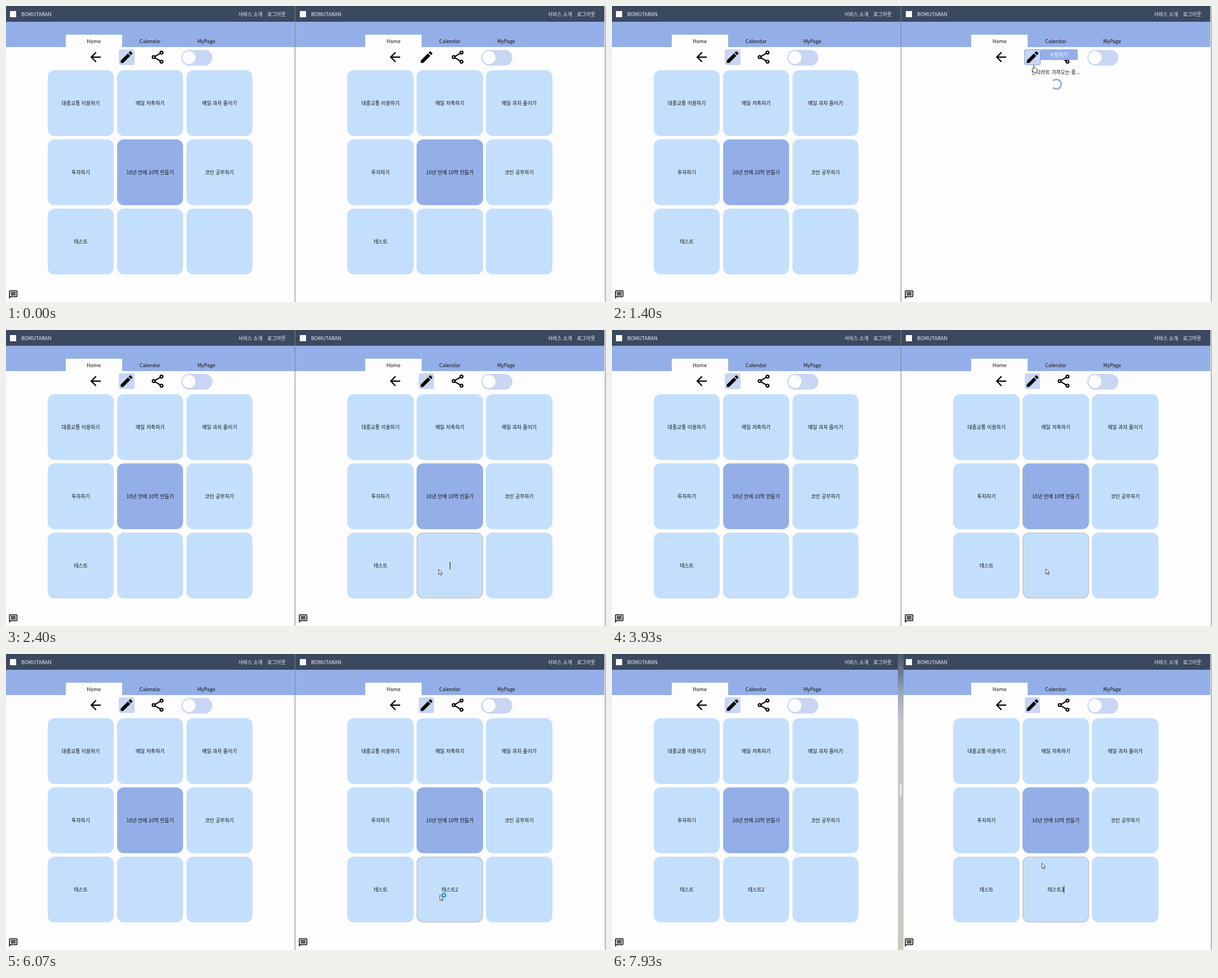
An HTML page that plays this animation: 1064 by 526 pixels, repeating every 8000 ms.

```html
<!DOCTYPE html>
<html lang="ko">
<head>
<meta charset="utf-8">
<title>Goal board</title>
<style>
html, body { margin: 0; width: 100%; height: 100%; overflow: hidden; }
body {
  position: relative; background: #fdfdfd; color: #111;
  font: 8.86px/14px "Noto Sans CJK KR", "Noto Sans CJK", "Noto Sans", sans-serif;
  --band: #94afe7; --pale: #c8d6f3; --cell: #c4dffc;
}
body *, body *::before { box-sizing: border-box; }
.pane, .main, .main *, header, header *, .split, .edge, .chat, #cursor { position: absolute; }
.pane { top: 0; height: 526px; overflow: hidden; }
.left { left: -1px; width: 513px; }
.right { left: 513px; width: 548px; }
svg { overflow: visible; display: block; }

header { inset: 0 0 auto; height: 28px; background: #3b495f; color: #f2f4f7; white-space: nowrap; }
header * { top: 8px; }
.logo { left: 8px; top: 9px; width: 11px; height: 11px; background: #fff; }
.brand { left: 28px; }
.about { right: 57px; }
.logout { right: 16px; }
.nav { position: absolute; inset: 28px 0 auto; height: 44.5px; background: var(--band); }

.main { left: 50%; top: 0; }
.tab { top: 50.5px; width: 99.6px; height: 22px; text-align: center; line-height: 23px; }
.tab.on { background: #fdfdfd; }
.icon { top: 77px; width: 27.7px; height: 27.7px; }
.icon svg { width: 100%; height: 100%; }
.fill { inset: 0; border-radius: 3px; background: var(--pale); }
.pencil.hover::before {
  content: ""; position: absolute; inset: -.3px; z-index: 1;
  border: 1.4px solid #7d9edb; border-radius: 3px;
}
.tip {
  left: -28.3px; top: 77px; width: 67px; height: 18.6px; border-radius: 3px;
  background: var(--band); color: #fff; text-align: center; line-height: 19px; visibility: hidden;
}
.pencil.hover ~ .tip { visibility: visible; }
.toggle { left: 55.5px; top: 78px; width: 55px; height: 27.5px; border-radius: 14px; background: var(--pale); }
.toggle i { left: 2.2px; top: 2.2px; width: 23px; height: 23px; border-radius: 50%; background: #fdfdfd; }
.cell {
  display: flex; align-items: center; justify-content: center;
  width: 117.4px; height: 117.4px; border-radius: 12px; background: var(--cell); white-space: nowrap;
}
.cell.core { background: var(--band); }
.cell.hover { box-shadow: inset 0 0 0 1.6px #c3c5ca; }
.cell span { position: relative; min-height: 14px; }
.cell .caret { position: absolute; left: 100%; top: 0; width: 1px; height: 13px; margin-left: -.5px; background: #111; }
.chat { left: 5px; top: 504.4px; width: 17.7px; height: 17.7px; }

.loading { left: -70px; top: 111px; width: 140px; text-align: center; }
.spinner {
  left: 61px; top: 18px; width: 19.5px; height: 19.5px; border-radius: 50%;
  border: 3.2px solid var(--band); border-left-color: transparent;
  animation: spin 1s linear infinite;
}
.split { left: 512px; top: 0; width: 1px; height: 526px; background: #7c7f83; }
.split.wide {
  left: 507px; width: 10px;
  background: linear-gradient(#4c5668, #7e8aa2 9%, #a4adc0 14%, #c3c6cb 24%, #c6c9c8 70%, #c4ccbb);
}
.wide i { position: absolute; left: 4px; top: 232px; width: 2px; height: 19px; border-radius: 1px; background: #fff; }
.edge { left: 1061px; top: 0; width: 3px; height: 526px; background: linear-gradient(90deg, #fdfdfd 33%, #8d958f 33% 67%, #d9e0d8 67%); }
#cursor { left: 0; top: 0; width: 1px; height: 1px; }
#cursor > * { position: absolute; }
#cursor .hand, #cursor.point .arrow { visibility: hidden; }
#cursor.point .hand { visibility: visible; }

/* 8 s cycle, hard switches */
.right .fill, .right .chat, .right .grid, .loading, .caret, .synced, .wide, .ring {
  animation: 8s step-end infinite;
}
.right .fill, .right .chat { animation-name: clicked; }
.right .grid { animation-name: reload; }
.loading { animation-name: load; }
.caret { animation-name: blink; }
.synced { animation-name: sync; }
.wide { animation-name: widen; }
.ring { animation-name: busy; }
@keyframes clicked { 0% { opacity: 0 } 15% { opacity: 1 } }
@keyframes reload { 0% { opacity: 1 } 15% { opacity: 0 } 19.5% { opacity: 1 } }
@keyframes load { 0% { opacity: 0 } 15% { opacity: 1 } 19.5% { opacity: 0 } }
@keyframes sync { 0% { opacity: 0 } 79.1% { opacity: 1 } }
@keyframes widen { 0% { opacity: 0 } 94.1% { opacity: 1 } }
@keyframes busy { 0% { opacity: 0 } 52.5% { opacity: 1 } 92.4% { opacity: 0 } }
@keyframes blink {
  0%, 35.87%, 49%, 75.75%, 89.12% { opacity: 0 }
  29.19%, 42.44%, 50.87%, 82.5%, 95.75% { opacity: 1 }
}
@keyframes spin { from { transform: rotate(-144deg) } to { transform: rotate(216deg) } }
</style>
</head>
<body>
<script>
const icons = {
  back: '<path d="M20 11H7.83l5.59-5.59L12 4l-8 8 8 8 1.41-1.41L7.83 13H20z"/>',
  pencil: '<path d="M3 17.25V21h3.75L17.81 9.94l-3.75-3.75zM20.71 7.04a1 1 0 0 0 0-1.41l-2.34-2.34a1 1 0 0 0-1.41 0l-1.83 1.83 3.75 3.75z"/>',
  share: '<g fill="none" stroke="#000" stroke-width="1.9"><path d="M8 10.9 16 6.2M8 13.1l8 4.7"/><circle cx="18" cy="5" r="2.1"/><circle cx="6" cy="12" r="2.1"/><circle cx="18" cy="19" r="2.1"/></g>',
  chat: '<path d="M4 4h16v12H5.17L4 17.17V4m0-2a2 2 0 0 0-2 2v18l4-4h14a2 2 0 0 0 2-2V4a2 2 0 0 0-2-2zm2 10h12v2H6zm0-3h12v2H6zm0-3h12v2H6z"/>'
};
const goals = ['대중교통 이용하기', '매일 저축하기', '매일 과자 줄이기', '투자하기',
  '10년 안에 10억 만들기', '코인 공부하기', '테스트', '', ''];

const svg = name => `<svg viewBox="0 0 24 24">${icons[name]}</svg>`;
const icon = (name, x, under = '') =>
  `<div class="icon ${name}" style="left:${x - 13.85}px">${under}${svg(name)}</div>`;
const tab = (name, i) =>
  `<div class="tab ${i ? '' : 'on'}" style="left:${(i - 1) * 99.75 - 49.8}px">${name}</div>`;

function pane(side, slot, extra) {
  const cells = goals.map((goal, i) =>
    `<div class="cell ${i === 4 ? 'core' : ''}" style="left:${i % 3 * 123 - 181.6}px;top:${114 + Math.floor(i / 3) * 123}px">${i === 7 ? slot : `<span>${goal}</span>`}</div>`).join('');
  return `<section class="pane ${side}">
    <header><i class="logo"></i><span class="brand">BOMUTARAN</span>
      <span class="about">서비스 소개</span><span class="logout">로그아웃</span></header>
    <div class="nav"></div>
    <div class="main">
      ${['Home', 'Calendar', 'MyPage'].map(tab).join('')}
      ${icon('back', -96.9)}${icon('pencil', -41.6, '<div class="fill"></div>')}${icon('share', 13.8)}
      <div class="toggle"><i></i></div>
      <div class="tip">수정하기</div>
      <div class="grid">${cells}</div>${extra}
    </div>
    <div class="chat">${svg('chat')}</div>
  </section>`;
}

document.body.innerHTML =
  pane('left', '<span class="synced">테스트2</span>', '') +
  pane('right', '<span><b id="typed" style="position:static;font-weight:400"></b><i class="caret"></i></span>',
    '<div class="loading">만다라트 가져오는 중...<i class="spinner"></i></div>') +
  `<div class="split"></div><div class="split wide"><i></i></div><div class="edge"></div>
  <svg id="cursor">
    <g fill="#fff" stroke="#2b2b33" stroke-width=".85" stroke-linejoin="round">
      <path class="arrow" d="M.4.4v9.2l2.1-1.9 1.5 3.2 1.4-.6L4 7.1h2.9z"/>
      <path class="hand" d="M-1 8V2.5a1 1 0 0 1 2 0V6l1.5.2 3 1q.8.4.6 1.4L5 13.5H0L-3.2 9.2q-.6-1 .2-1.5 1-.4 2 .8z"/>
    </g>
    <circle class="ring" cx="7.5" cy=".5" r="3.1" fill="#c3e3fb" stroke="#1f8fe0" stroke-width="2.3"/>
  </svg>`;

// time, x, y of the pointer tip
const path = [
  [270, 888, 2], [450, 850, 40], [600, 790, 75], [690, 753, 91], [870, 746, 98],
  [1200, 746, 98], [1330, 748, 104.4], [1470, 748, 104.4], [1600, 754, 145], [1730, 760, 231],
  [1870, 761, 242], [2100, 764, 330], [2270, 767, 415], [2330, 767, 425], [2730, 767, 425],
  [3070, 769, 424], [4070, 769, 424], [4200, 769, 428], [6270, 769, 428], [6500, 640, 434],
  [6800, 360, 449], [7000, 282, 457], [7130, 282, 457], [7330, 420, 425], [7470, 505, 405],
  [7600, 520, 400], [7930, 772, 370]
];
const keys = [[4070, 'ㅌ'], [4200, '테'], [4330, '텟'], [4730, '테스'], [5000, '테슽'], [5200, '테스트'], [5530, '테스트2']];

function pointer(t) {
  if (t < path[0][0]) return [-50, -50];
  const i = path.findIndex(p => p[0] > t);
  if (i < 0) return path[path.length - 1].slice(1);
  const [t0, x0, y0] = path[i - 1], [t1, x1, y1] = path[i];
  const k = (t - t0) / (t1 - t0);
  return [x0 + (x1 - x0) * k, y0 + (y1 - y0) * k];
}

const cursor = document.getElementById('cursor');
const typed = document.getElementById('typed');
const pencil = document.querySelector('.right .pencil');
const targets = [pencil, ...document.querySelectorAll('.cell')].map(el => [el, el.getBoundingClientRect()]);
const clock = document.querySelector('.caret').getAnimations()[0];

function render() {
  const t = (clock.currentTime || 0) % 8000;
  const [x, y] = pointer(t);
  cursor.style.transform = `translate(${x}px, ${y}px)`;
  for (const [el, r] of targets)
    el.classList.toggle('hover', x >= r.left && x <= r.right && y >= r.top && y <= r.bottom);
  cursor.classList.toggle('point', pencil.classList.contains('hover'));
  const text = keys.reduce((s, [at, word]) => t >= at ? word : s, '');
  if (typed.textContent !== text) typed.textContent = text;
  requestAnimationFrame(render);
}
render();
</script>
</body>
</html>
```
